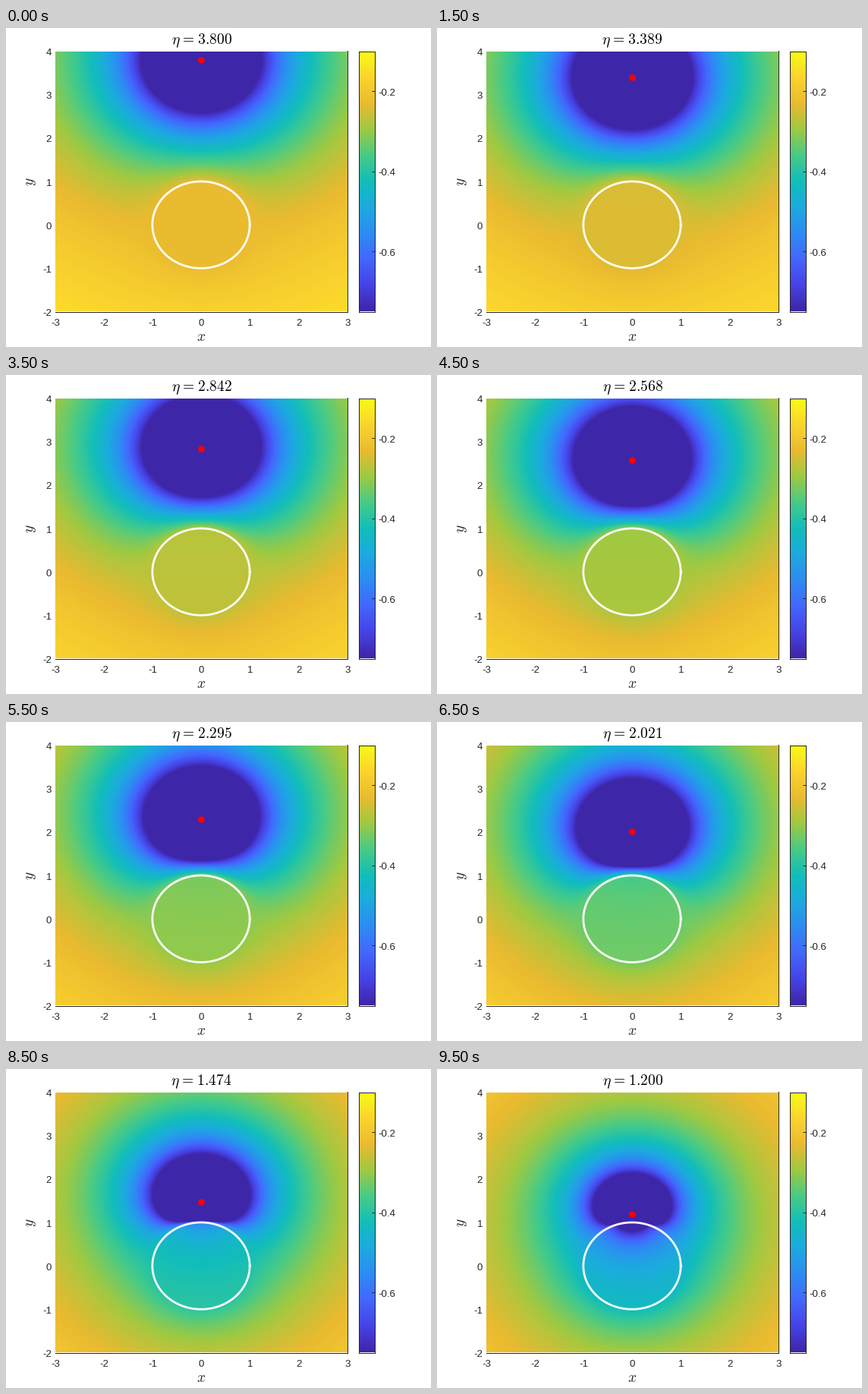
Write a matplotlib script that moves like this. It is 560 px wide and 420 px high and loops after 10000 ms.

```python
import numpy as np
import matplotlib.pyplot as plt
from matplotlib.animation import FuncAnimation
from matplotlib.colors import LinearSegmentedColormap

W, H, DPI = 560, 420, 100
FRAMES, INTERVAL = 20, 500
START, END = 3.8, 1.2
LOW, HIGH = -0.75, -0.1
LEFT, TOP, RIGHT, BOTTOM = 64.5, 30.5, 449.5, 373.5
INK = "#262626"

plt.rcParams.update({"font.family": "Liberation Sans", "mathtext.fontset": "cm"})

# Evenly spaced key colours of parula
parula = LinearSegmentedColormap.from_list("parula", [
    "#3E26A8", "#4743E7", "#4367FD", "#2D8CF3", "#1CAADF", "#12BEB9",
    "#48CB86", "#9FC942", "#EABA30", "#FBD42E", "#F9FB15"])

COLS, ROWS = 385, 343
X, Y = np.meshgrid(np.linspace(-3, 3, COLS), np.linspace(-2, 4, ROWS))
R = np.hypot(X, Y)


def distance(height, softness):
    return np.sqrt(X**2 + (Y - height)**2 + softness**2) + 1e-4


def potential(eta):
    """Softened point charge at (0, eta) with its image in the unit sphere."""
    s = 1 / eta
    leak = 0.24 * s**2
    level = 0.103 + 0.477 * s - leak * s
    decay = 1.05 - 0.45 * s
    soft = 0.6 * (1 - s)
    r = distance(eta, soft)
    image = distance(s, soft * s)
    outside = -1 / r + (1 - leak) * s / image - level / np.maximum(R, 1)**decay
    inside = -leak / r - level
    return np.where(R > 1, outside, inside)


def add_specks(field, eta, seed):
    """A few stray samples on arcs below the charge."""
    rng = np.random.default_rng(seed)
    angle = rng.uniform(-np.pi, 0, 30)
    radius = rng.uniform(2.8, 4.6, 30)
    for x, y in zip(radius * np.cos(angle), eta + radius * np.sin(angle)):
        if abs(x) < 3 and -2 < y < 4 and np.hypot(x, y) > 1.1:
            field[int((y + 2) / 6 * ROWS), int((x + 3) / 6 * COLS)] -= 0.03


def pixel_axes(left, right):
    ax = fig.add_axes([left / W, 1 - BOTTOM / H, (right - left) / W, (BOTTOM - TOP) / H])
    ax.set(xticks=[], yticks=[])
    for spine in ax.spines.values():
        spine.set(linewidth=0.72, color=INK)
    return ax


def label(x, y, text, size=13.3, **kw):
    kw = {"ha": "center", "va": "center", "color": INK, **kw}
    return fig.text(x / W, 1 - y / H, text, fontsize=size * 72 / DPI, **kw)


fig = plt.figure(figsize=(W / DPI, H / DPI), dpi=DPI, facecolor="white")

ax = pixel_axes(LEFT, RIGHT)
ax.spines[["left", "top"]].set_visible(False)
picture = ax.imshow(potential(START), cmap=parula, vmin=LOW, vmax=HIGH, origin="lower",
                    extent=(-3, 3, -2, 4), aspect="auto", interpolation="nearest")
angle = np.linspace(0, 2 * np.pi, 300)
ax.plot(np.cos(angle), np.sin(angle), color="white", lw=2.0, alpha=0.95)
charge, = ax.plot([0], [START], "o", color="red", ms=6.2, mew=0)
ax.set(xlim=(-3, 3), ylim=(-2, 4))

bar = pixel_axes(464.5, 485.5)
bar.imshow(np.linspace(0, 1, 256)[:, None], cmap=parula, origin="lower",
           extent=(0, 1, LOW, HIGH), aspect="auto")
bar.yaxis.tick_right()
bar.set_yticks([-0.6, -0.4, -0.2], labels=[""] * 3)
bar.tick_params(axis="y", direction="in", length=2.9, width=0.72, color=INK)

for v in range(-3, 4):
    label(LEFT + 0.5 + (v + 3) / 6 * (RIGHT - LEFT), 389, str(v))
for v in range(-2, 5):
    label(60, BOTTOM + 2.5 - (v + 2) / 6 * (BOTTOM - TOP), str(v), ha="right")
for v in (-0.2, -0.4, -0.6):
    y = TOP + 2.5 + (HIGH - v) / (HIGH - LOW) * (BOTTOM - TOP)
    label(490, y, f"{v:.1f}", ha="left")
label(257, 408, "$x$", 19.5)
label(33, 202, "$y$", 19.5, rotation=90)
title = label(257.5, 21, "", 19.5, va="baseline", color="black")


def draw(i):
    eta = START + (END - START) * i / (FRAMES - 1)
    field = potential(eta)
    add_specks(field, eta, i)
    picture.set_data(field)
    charge.set_ydata([eta])
    title.set_text(rf"$\eta\hspace{{0.08}} = \hspace{{0.08}}{eta:.3f}$")
    return picture, charge, title


anim = FuncAnimation(fig, draw, frames=FRAMES, interval=INTERVAL, repeat=True, repeat_delay=0)
plt.show()
```
